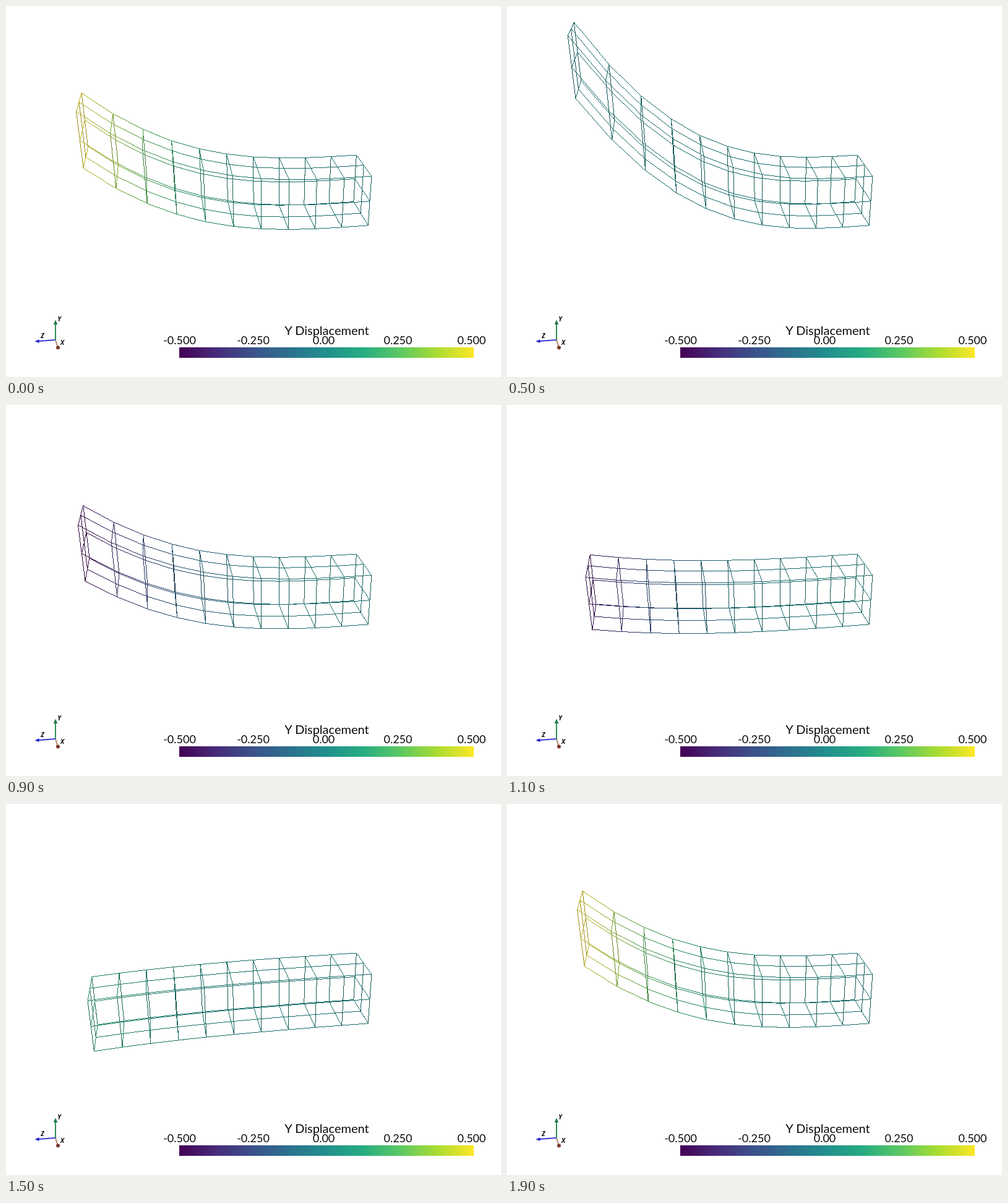
An HTML page with a canvas that plays this animation: 800x600 px, repeating every 2 s.

```html
<!DOCTYPE html>
<html lang="en">
<head>
<meta charset="utf-8">
<title>Beam displacement</title>
<style>
  html, body { margin: 0; width: 100%; height: 100%; overflow: hidden; background: #fff; }
  svg, canvas { position: absolute; left: 0; top: 0; width: 800px; height: 600px; }
  #bar { position: absolute; left: 280px; top: 552px; width: 476px; height: 17px; }
  text { fill: #0b0b0b; font-family: Lato, "Open Sans", sans-serif; text-anchor: middle; }
  .title { font-size: 20px; }
  .label { font-size: 18px; }
  .axis { font: italic bold 10px "Open Sans", sans-serif; }
</style>
</head>
<body>
<div id="bar"></div>
<svg viewBox="0 0 800 600">
  <g class="title"><text x="518.5" y="531.5">Y Displacement</text></g>
  <g class="label">
    <text x="280.5" y="546.5">-0.500</text>
    <text x="399.5" y="546.5">-0.250</text>
    <text x="513.5" y="546.5">0.00</text>
    <text x="633.5" y="546.5">0.250</text>
    <text x="752.5" y="546.5">0.500</text>
  </g>
  <g stroke-width="2">
    <path d="M80 540L83.3 551" stroke="#b48a72"/>
    <path d="M80 540L53 542" stroke="#3a3ad8"/>
    <path d="M80 540V514" stroke="#2e8b57"/>
  </g>
  <path d="M80 507.5L83.3 515H76.7Z" fill="#237a4b"/>
  <path d="M46.5 542.3L53.5 539.3V545Z" fill="#2424cc"/>
  <circle cx="84" cy="552.5" r="3" fill="#7c3a2c"/>
  <text class="axis" x="86" y="510">Y</text>
  <text class="axis" x="59" y="537">Z</text>
  <text class="axis" x="91" y="548">X</text>
</svg>
<canvas id="view" width="800" height="600"></canvas>
<script>
const FRAMES = 20, FRAME_MS = 100, STATIONS = 10;
const ctx = document.getElementById('view').getContext('2d');

const viridis = [
  [68, 1, 84], [71, 44, 122], [59, 81, 139], [44, 113, 142], [33, 144, 141],
  [39, 173, 129], [92, 200, 99], [170, 220, 50], [253, 231, 37]
];
document.getElementById('bar').style.background =
  `linear-gradient(90deg, ${viridis.map(c => `rgb(${c})`).join()})`;

const mix = (a, b, t) => a.map((v, i) => v + (b[i] - v) * t);
const dot = (a, b) => a[0] * b[0] + a[1] * b[1] + a[2] * b[2];
const sub = (a, b) => a.map((v, i) => v - b[i]);
const cross = (a, b) => [
  a[1] * b[2] - a[2] * b[1], a[2] * b[0] - a[0] * b[2], a[0] * b[1] - a[1] * b[0]
];
const unit = a => a.map(v => v / Math.hypot(...a));

function colorAt(value) {
  const p = Math.max(0, Math.min(1, value + 0.5)) * (viridis.length - 1);
  const i = Math.min(Math.floor(p), viridis.length - 2);
  return mix(viridis[i], viridis[i + 1], p - i);
}

// Perspective camera with a 30 degree view angle
const eye = [11.9151, 6.1139, 3.6125];
const forward = unit(sub([0, 0.375, 2], eye));
const right = unit(cross(forward, [-0.42546, 0.90242, -0.0679]));
const up = cross(right, forward);
const focal = 300 / Math.tan(Math.PI / 12);

function project(point) {
  const ray = sub(point, eye), scale = focal / dot(ray, forward);
  return [400 + scale * dot(ray, right), 300 - scale * dot(ray, up)];
}

// Surface edges of a 1 x 1 x 5 beam; both end faces carry a middle cross
const edges = [];
const addEdge = (a, b, shade) => edges.push({ a, b, shade });
const LONG = 0.76, ACROSS = 0.76, UPRIGHT = 0.62;
for (let s = 0; s <= STATIONS; s++) {
  const z = s / 2;
  const isEnd = s === 0 || s === STATIONS;
  for (const p of isEnd ? [0, 0.5, 1] : [0, 1]) {
    addEdge([0, p, z], [1, p, z], ACROSS);
    addEdge([p, 0, z], [p, 1, z], UPRIGHT);
  }
  if (s === STATIONS) break;
  for (const x of [0, 0.5, 1]) for (const y of [0, 0.5, 1]) {
    if (x !== 0.5 || y !== 0.5) addEdge([x, y, z], [x, y, z + 0.5], LONG);
  }
}

// One-pixel line without smoothing, colour blended between its ends
function drawLine([x0, y0], [x1, y1], c0, c1) {
  const steps = Math.max(1, Math.ceil(Math.max(Math.abs(x1 - x0), Math.abs(y1 - y0))));
  for (let i = 0; i <= steps; i++) {
    const t = i / steps;
    ctx.fillStyle = `rgb(${mix(c0, c1, t).map(Math.round)})`;
    ctx.fillRect(Math.floor(x0 + (x1 - x0) * t), Math.floor(y0 + (y1 - y0) * t), 1, 1);
  }
}

const wave = k => Math.cos(2 * Math.PI * k / (FRAMES - 1));
const bend = z => z ** 3 / 250;

function drawBeam(frame) {
  // The offset accumulates the wave, while the colour follows its current value
  let lift = 2;
  for (let k = 0; k <= frame; k++) lift += wave(k);
  const place = ([x, y, z]) => project([x, y + lift * bend(z), z]);
  const tint = (p, shade) => colorAt(wave(frame) * bend(p[2])).map(v => v * shade);

  ctx.clearRect(0, 0, 800, 600);
  for (const { a, b, shade } of edges) {
    drawLine(place(a), place(b), tint(a, shade), tint(b, shade));
  }
}

const start = performance.now();
let shown = -1;
function tick() {
  const frame = Math.floor((performance.now() - start) / FRAME_MS) % FRAMES;
  if (frame !== shown) drawBeam(shown = frame);
  requestAnimationFrame(tick);
}
tick();
</script>
</body>
</html>
```
